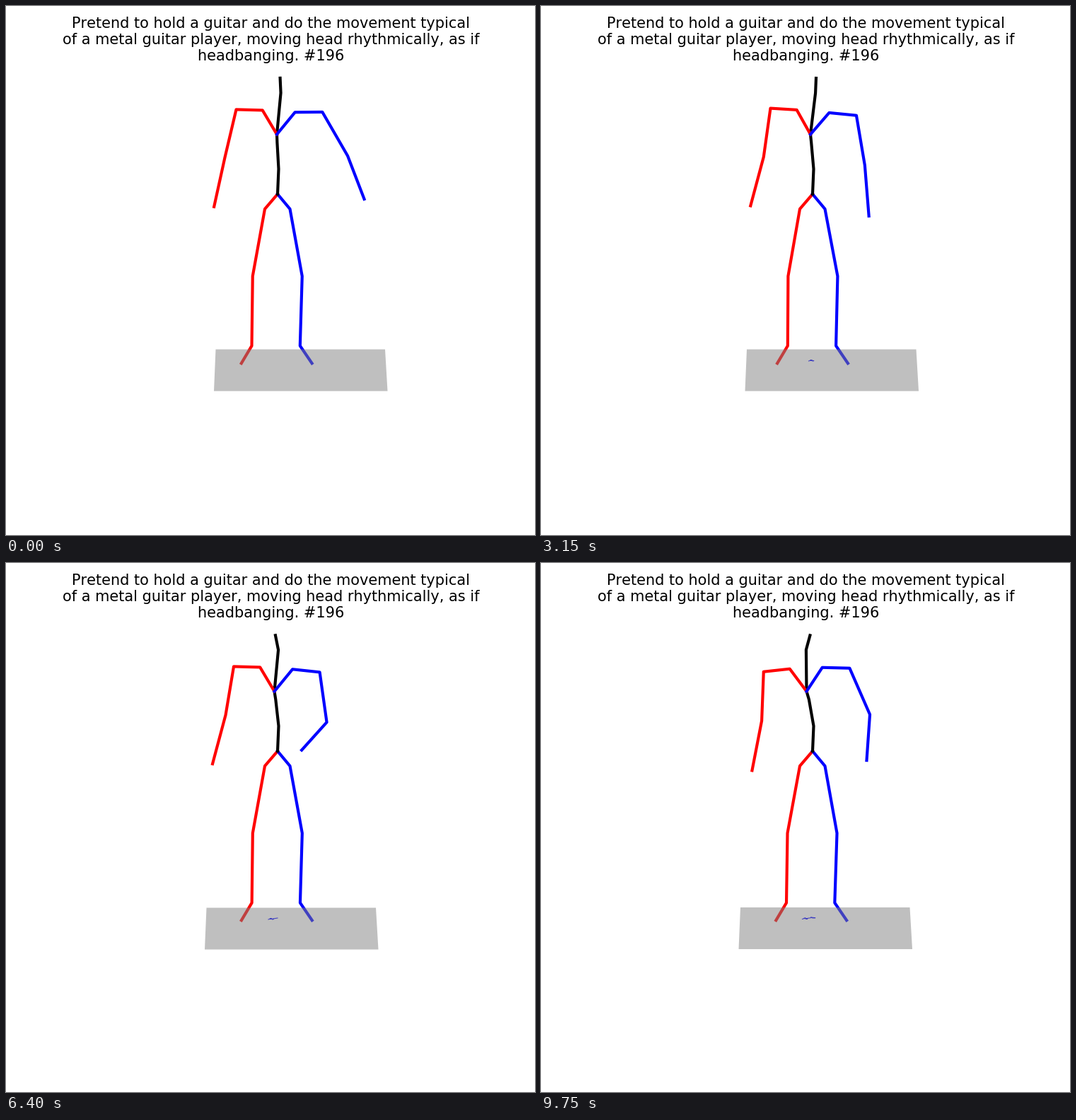
These frames come from a looping animation (748 by 748 pixels, 9800 ms). A matplotlib script:

```python
import numpy as np
import matplotlib.pyplot as plt
from matplotlib.animation import FuncAnimation

SIZE, DPI = 748, 75
FRAMES, INTERVAL = 196, 50
TITLE = ("Pretend to hold a guitar and do the movement typical\n"
         "of a metal guitar player, moving head rhythmically, as if\n"
         "headbanging. #196")
STEPS = np.arange(FRAMES)
POSES = [0, 26, 63, 101, 128, 158, 195]


def ease(values, times=POSES):
    """Smooth curve through the keys that never overshoots them."""
    t, v = np.array(times, float), np.array(values, float)
    gap = np.diff(t)
    slope = np.diff(v) / gap
    a, b = slope[:-1], slope[1:]
    tangent = np.zeros(len(v))
    same = a * b > 0
    tangent[1:-1][same] = 2 * a[same] * b[same] / (a[same] + b[same])
    k = np.clip(np.searchsorted(t, STEPS, side="right") - 1, 0, len(gap) - 1)
    u, h = (STEPS - t[k]) / gap[k], gap[k]
    return ((2 * u**3 - 3 * u**2 + 1) * v[k] + (u**3 - 2 * u**2 + u) * h * tangent[k]
            + (3 * u**2 - 2 * u**3) * v[k + 1] + (u**3 - u**2) * h * tangent[k + 1])


def path(x, y):
    """One point per step; plain numbers stay fixed."""
    return np.column_stack(np.broadcast_arrays(x, y, STEPS)[:2])


def bone(length, angle, side=1):
    """Vector whose angle opens from straight down towards the given side."""
    angle = np.radians(angle)
    return path(side * length * np.sin(angle), length * np.cos(angle))


def turn(x, y, angle):
    c, s = np.cos(np.radians(angle)), np.sin(np.radians(angle))
    return path(x * c - y * s, x * s + y * c)


# Body controls: pixels for shifts, degrees for angles
lean = ease([-1, -0.5, -3, -4.5, -4.5, -9, -8.5])
tilt = ease([2.2, 3.2, 3.7, -3.3, 2.2, -4.3, -3.8])
roll = ease([-2.6, 2.6, 2.4, -1.2, -11.3, -12.4, 15.2])
step = 0.5 - 2 * np.sin(2 * np.pi * STEPS / 84) * np.exp(-STEPS / 150)

# Fretting arm: upper arm and forearm angles
fret_upper = ease([13.3, 13.8, 8, -0.8, 9.5, 3.2, 2.2])
fret_fore = ease([12.4, 5.2, 15, -6.8, 15, 5.8, 11])

# Strumming arm: time, upper arm angle, forearm angle, visible forearm length
STRUM = [(0, 30, 21, 65.5), (26, 18.5, -33, 49), (63, 9.6, 4.6, 72), (80, 12, 0, 62),
         (101, 54, 175, 56), (128, 8, -42, 53), (158, 38, 187, 48), (195, 23.6, -4, 65)]
beats, *arm_keys = zip(*STRUM)
strum_upper, strum_fore, reach = (ease(keys, beats) for keys in arm_keys)


def chain(start, *bones):
    return np.cumsum([start, *bones], axis=0)


def leg(hip_x, knee_x, ankle_x, toe_dx):
    ankle = path(ankle_x + step, 480.5)
    return np.array([root, path(hip_x, 287), path(knee_x + 0.5 * step, 382),
                     ankle, ankle + path(toe_dx, 24.7)])


root = path(384, 266)
chest = path(384 + lean, 181.5)
neck = chest + turn(3.3, -58.8, tilt)
spine = np.array([root, path(385.5, 230.5), path(384 + 0.6 * lean, 193), chest,
                  neck, neck + bone(21, 180 - roll)])
right_arm = chain(chest, turn(-21.6, -33.3, tilt), bone(37.2, 88.7 + 1.3 * tilt, -1),
                  bone(69.5, fret_upper, -1), bone(71.5, fret_fore, -1))
left_arm = chain(chest, turn(24.4, -32.2, tilt), bone(38.7, 81.5 + 0.3 * strum_upper),
                 bone(71.5, strum_upper), bone(reach, strum_fore))

# Floor shift relative to the hips, which stay fixed on the stage
drift = path(
    ease([0, -4.5, -2.2, -7.3, -5.5, -5.5, -10, -13, -12, -18.3, -14.5],
         [0, 26, 40, 50, 63, 80, 101, 128, 158, 184, 195]),
    ease([0, 1.5, 0, 1.5, 2, 2.5, 1.5]))
FLOOR = np.array([(296.5, 485.5), (536, 485.5), (539.5, 544.5), (294, 544.5)])
SHADOW = np.array([384, 502])

plt.rcParams["text.kerning_factor"] = 6
fig = plt.figure(figsize=(SIZE / DPI, SIZE / DPI), dpi=DPI, facecolor="white")
fig.suptitle(TITLE, x=0.501, fontsize=20, fontfamily="DejaVu Sans")
ax = fig.add_axes([0, 0, 1, 1])
ax.set(xlim=(0, SIZE), ylim=(SIZE, 0))
ax.axis("off")


def stroke(color, width):
    return ax.plot([], [], color=color, lw=width, solid_capstyle="projecting",
                   solid_joinstyle="round")[0]


trail = stroke("blue", 1)
limbs = [(stroke(color, 4), joints) for color, joints in [
    ("red", leg(366, 348.5, 347, -14.7)), ("blue", leg(401.5, 418.5, 415.3, 16.8)),
    ("black", spine), ("red", right_arm), ("blue", left_arm)]]
floor = plt.Polygon(FLOOR, facecolor=(0.5, 0.5, 0.5, 0.5), lw=0, zorder=5)
ax.add_patch(floor)


def update(i):
    for line, joints in limbs:
        line.set_data(*joints[:, i].T)
    trail.set_data(*(SHADOW + drift[i] - drift[:i + 1]).T)
    floor.set_xy(FLOOR + drift[i])
    return [floor, trail] + [line for line, _ in limbs]


anim = FuncAnimation(fig, update, frames=FRAMES, interval=INTERVAL,
                     repeat=True, repeat_delay=0)
plt.show()
```
